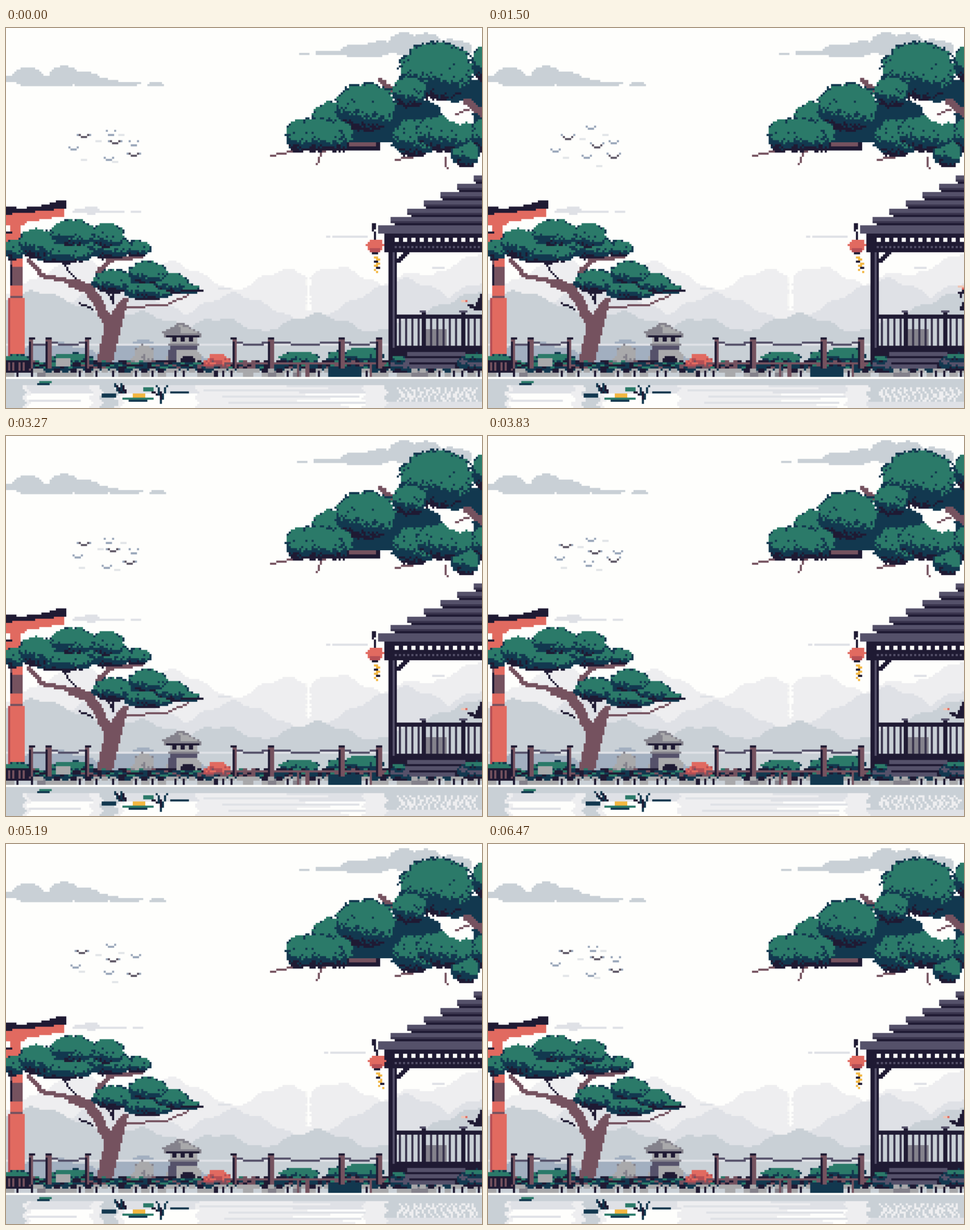
These frames come from a looping animation (837 by 669 pixels, 6.54 s). An HTML page with a canvas:

```html
<!DOCTYPE html>
<html>
<head>
<meta charset="utf-8">
<title>Lakeside garden</title>
<style>
html, body { margin: 0; width: 100%; height: 100%; overflow: hidden; background: #fefefc; }
canvas { display: block; width: 837px; height: 669px; }
</style>
</head>
<body>
<canvas id="stage" width="687" height="549"></canvas>
<script>
const W = 229, H = 183, S = 837 / W, LOOP = 6540, TAU = Math.PI * 2;
const SKY = '#fefefc', CLOUD = '#c9d0d6', MIST = '#dfe1e6', HAZE = '#eeeef0', BLUE = '#a2afc0',
  GREEN = '#2b7a69', TEAL = '#12384f', INK = '#1f1a33', SHADE = '#39344d', ROOF = '#55516a', BARK = '#75525f',
  RED = '#e16a60', RUST = '#b64f55', STONE = '#a9a9ab', ASH = '#84828c', GOLD = '#f2b640';

function layer() {
  const c = document.createElement('canvas');
  c.width = W;
  c.height = H;
  return c;
}
const small = layer(), pixels = small.getContext('2d');
const screen = document.getElementById('stage').getContext('2d');
screen.imageSmoothingEnabled = false;
let g = pixels;

const noise = (x, y) => { const v = Math.sin(x * 12.9898 + y * 78.233) * 43758.5453; return v - Math.floor(v); };
const cell = v => Math.round(v / S);
const wave = (t, cycles, phase = 0) => Math.sin(t / LOOP * TAU * cycles + phase);
const between = (t, a, b) => t >= a && t < b ? 1 : 0;

function dot(c, x, y, w = 1, h = 1) { g.fillStyle = c; g.fillRect(x, y, w, h); }

function rect(c, x, y, w, h) {
  const a = cell(x), b = cell(y);
  dot(c, a, b, Math.max(1, cell(x + w) - a), Math.max(1, cell(y + h) - b));
}

// Scanline fill without smoothing; points are a flat x, y list in stage pixels
function poly(c, p) {
  for (let r = 0; r < H; r++) {
    const y = (r + 0.5) * S, hits = [];
    for (let i = 0; i < p.length; i += 2) {
      const j = (i + 2) % p.length, y0 = p[i + 1], y1 = p[j + 1];
      if ((y0 <= y) !== (y1 <= y)) hits.push(p[i] + (y - y0) / (y1 - y0) * (p[j] - p[i]));
    }
    hits.sort((a, b) => a - b);
    for (let k = 0; k + 1 < hits.length; k += 2)
      dot(c, cell(hits[k]), r, cell(hits[k + 1]) - cell(hits[k]), 1);
  }
}

function line(c, p, w = 1) {
  for (let i = 0; i + 3 < p.length; i += 2) {
    const x = p[i] / S, y = p[i + 1] / S, dx = p[i + 2] / S - x, dy = p[i + 3] / S - y;
    const n = Math.ceil(Math.max(Math.abs(dx), Math.abs(dy))) || 1;
    for (let k = 0; k <= n; k++)
      dot(c, Math.floor(x + dx * k / n - (w - 1) / 2), Math.floor(y + dy * k / n - (w - 1) / 2), w, w);
  }
}

// Visits the cells of an ellipse with offsets u, v and squared radius d
function ellipse(cx, cy, rx, ry, paint) {
  for (let y = cell(cy - ry * 1.2); y <= cell(cy + ry * 1.2); y++)
    for (let x = cell(cx - rx * 1.2); x <= cell(cx + rx * 1.2); x++) {
      const u = ((x + 0.5) * S - cx) / rx, v = ((y + 0.5) * S - cy) / ry;
      paint(x, y, u, v, u * u + v * v);
    }
}

const puffs = (c, list, shift = 0) => list.forEach(e => ellipse(...e, (x, y, u, v, d) => {
  if (d < 1) dot(c, x + shift, y);
}));

// Leafy ellipses over a dark mass, shaded towards the lower left
function foliage(list, tones = [GREEN, TEAL, INK]) {
  const leaf = (i, x, y, u, v) => 1 + 0.06 * Math.sin(Math.atan2(v, u) * 9 + i * 2) + (noise(x, y) - 0.5) * 0.22;
  list.forEach((e, i) => ellipse(e[0], e[1] + 5, e[2], e[3], (x, y, u, v, d) => {
    if (d < leaf(i, x, y, u, v)) dot(tones[v > 0.7 ? 2 : 1], x, y);
  }));
  list.forEach((e, i) => ellipse(...e, (x, y, u, v, d) => {
    const rim = leaf(i, x, y, u, v);
    if (d > rim) return;
    const s = v - u * 0.25 + (noise(y, x) - 0.5) * 0.4;
    const fleck = d > rim - 0.1 || (s > -0.3 && noise(x + 7, y + 3) > 0.95);
    dot(s > 0.85 ? tones[2] : s > 0.38 || fleck ? tones[1] : tones[0], x, y);
  }));
}

// Rounded peaks [x, y] with a common slope
function ridge(c, peaks, slope) {
  for (let x = 0; x < W; x++) {
    const y = Math.min(...peaks.map(([px, py]) => py + slope * (Math.hypot(x * S - px, 22) - 22)));
    const top = cell(y + 3 * Math.sin(x * 0.45));
    if (top < 164) dot(c, x, top, 1, 164 - top);
  }
}

function mountains() {
  ridge(HAZE, [[130, 408], [285, 412], [492, 425], [580, 421], [720, 430], [845, 394]], 0.55);
  ridge(MIST, [[190, 450], [400, 468], [700, 442], [840, 448]], 0.52);
  ridge(CLOUD, [[50, 464], [230, 500], [372, 511], [545, 504], [860, 456]], 0.42);
  ridge(BLUE, [[85, 553], [235, 550]], 0.35);
  rect(MIST, 0, 557, 672, 4);
  rect(MIST, 372, 457, 22, 4);
  rect(MIST, 750, 419, 22, 4);
}

function torii() {
  rect(RED, 8, 345, 18, 36);
  rect(INK, 0, 358, 10, 4);
  rect(RED, 0, 362, 10, 13);
  rect(BARK, 7, 403, 22, 55);
  rect(RED, 12, 403, 17, 16);
  rect(INK, 7, 415, 5, 40);
  rect(RED, 7, 454, 24, 22);
  rect(BARK, 7, 470, 24, 4);
  rect(RED, 3, 476, 31, 112);
  rect(RUST, 3, 476, 5, 112);
  poly(RED, [0, 327, 70, 322, 104, 316, 104, 331, 38, 341, 28, 348, 0, 348]);
  poly(INK, [0, 315, 30, 317, 75, 311, 78, 306, 106, 304, 106, 316, 70, 322, 0, 328]);
}

function pine() {
  poly(BARK, [170, 502, 182, 508, 202, 478, 216, 474, 206, 512, 186, 592, 158, 592, 174, 525]);
  line(BARK, [42, 408, 62, 436, 122, 448], 2);
  line(BARK, [118, 448, 142, 458, 158, 475, 180, 520], 4);
  line(BARK, [205, 492, 280, 488, 332, 464]);
  line(BARK, [152, 455, 165, 425, 184, 408, 236, 402], 2);
  line(INK, [98, 413, 112, 430, 124, 442]);
  line(INK, [130, 485, 152, 494]);
  line(INK, [180, 468, 190, 484, 186, 466]);
  foliage([[230, 386, 24, 12], [14, 388, 18, 16], [180, 384, 42, 18], [178, 365, 30, 22], [100, 393, 54, 17],
    [55, 377, 34, 24], [118, 360, 40, 23]]);
  foliage([[318, 457, 22, 6], [250, 460, 44, 14], [290, 447, 30, 16], [188, 444, 35, 19], [250, 430, 34, 20]]);
  line(INK, [310, 461, 346, 462]);
}

function bigTree() {
  line(BARK, [467, 224, 485, 222, 512, 212]);
  line(BARK, [548, 240, 550, 228, 560, 216]);
  line(BARK, [657, 92, 680, 108], 2);
  line(BARK, [687, 232, 725, 225]);
  line(BARK, [775, 247, 772, 230]);
  puffs(TEAL, [[640, 180, 62, 24], [712, 152, 56, 28], [800, 110, 40, 22], [838, 140, 18, 60]]);
  foliage([[838, 60, 18, 28], [757, 73, 66, 49], [709, 110, 31, 25], [575, 153, 36, 24], [633, 137, 54, 40],
    [585, 188, 26, 26], [543, 186, 50, 27], [516, 188, 24, 27], [808, 217, 25, 24], [838, 185, 22, 26],
    [718, 191, 40, 31], [772, 183, 52, 31]]);
  poly(SKY, [762, 146, 780, 134, 806, 128, 822, 145, 818, 160, 800, 171, 778, 162]);
  line(BARK, [837, 150, 824, 142, 810, 128], 3);
  line(BARK, [818, 142, 790, 152]);
  rect(INK, 598, 200, 60, 14);
  rect(BARK, 603, 202, 46, 6);
}

function gazebo() {
  for (let i = 0; i < 6; i++) {
    const x = 822 - i * 29, y = 260 + i * 14.6;
    rect(INK, x + 5, y + 10, 260, 5);
    rect(ROOF, x, y, 260, 11);
    rect(SHADE, x, y + 7, 260, 4);
  }
  rect(ROOF, 656, 348, 181, 14);
  rect(INK, 664, 361, 173, 34);
  for (let x = 685; x < 837; x += 14.6) rect(SKY, x, 368, 7, 7);
  for (let x = 682; x < 837; x += 7.3) rect(ROOF, x, 382, 4, 7);
  rect(INK, 672, 390, 14, 210);
  rect(ROOF, 680, 394, 4, 170);
  line(INK, [686, 411, 704, 394], 2);
  rect(ASH, 740, 530, 36, 32);
  for (let x = 690; x < 837; x += 11) rect(SHADE, x, 512, 5, 50);
  for (const x of [730, 800]) {
    rect(INK, x, 500, 7, 64);
    rect(ROOF, x - 3, 497, 13, 4);
  }
  rect(INK, 684, 505, 153, 6);
  rect(INK, 684, 558, 153, 43);
  for (let i = 0; i < 3; i++) rect(ROOF, 706 - i * 9, 569 + i * 11, 100, 7);
  foliage([[692, 594, 18, 8], [820, 588, 26, 11]], [ROOF, TEAL, INK]);
  foliage([[823, 578, 18, 6], [690, 582, 12, 5]]);
}

function shrine() {
  poly(ASH, [275, 536, 304, 519, 314, 521, 345, 538, 343, 543, 278, 543]);
  poly(STONE, [304, 522, 322, 528, 343, 538, 308, 536]);
  rect(INK, 280, 540, 60, 4);
  rect(STONE, 289, 543, 48, 14);
  for (let x = 294; x < 330; x += 14) rect(INK, x, 544, 7, 7);
  rect(ASH, 284, 554, 55, 6);
  rect(ROOF, 289, 560, 47, 7);
  poly(STONE, [288, 566, 336, 566, 345, 580, 345, 600, 280, 600, 282, 580]);
  rect(ROOF, 286, 566, 14, 32);
  poly(INK, [308, 600, 308, 584, 314, 576, 326, 576, 333, 584, 333, 600]);
  rect(GREEN, 316, 588, 10, 9);
}

function bank() {
  foliage([[20, 585, 26, 10], [115, 582, 38, 10], [515, 580, 35, 10], [590, 578, 25, 10], [628, 575, 36, 13]]);
  foliage([[243, 574, 17, 17], [230, 584, 10, 9]], [STONE, ASH, ROOF]);
  rect(TEAL, 0, 588, 837, 15);
  for (let x = 0; x < W; x++)
    for (let r = 160; r < 164; r++) {
      const n = noise(x >> 1, r);
      if (n > 0.45) dot(n > 0.86 ? GREEN : n > 0.76 ? BARK : INK, x, r);
    }
  rect(STONE, 0, 602, 837, 13);
  for (let i = 0; i < 60; i++) {
    const x = i * 14, n = noise(i, 31);
    rect(n > 0.6 ? CLOUD : n > 0.45 ? ASH : STONE, x, 603, 14, 11);
    rect(n < 0.3 ? INK : n < 0.5 ? TEAL : STONE, x, 600, 11, 5);
    if (n > 0.75) rect(INK, x + 3, 604, 4, 10);
  }
  rect(INK, 0, 585, 46, 23);
  for (let x = 3; x < 46; x += 9) rect(BARK, x, 590, 4, 14);
  rect(STONE, 88, 581, 24, 16);
  rect(STONE, 418, 598, 18, 16);
  rect(TEAL, 565, 596, 60, 17);
  for (const x of [510, 528, 638]) rect(BARK, x, 592, 6, 24);
  foliage([[358, 588, 11, 6], [384, 587, 11, 7], [372, 581, 15, 9]], [RED, RUST, BARK]);
  rect(SKY, 0, 615, 837, 4);
}

function fence() {
  const posts = [45, 75, 144, 401, 466, 590, 656];
  posts.forEach((x, i) => {
    const next = posts[i + 1], mid = (x + next) / 2;
    if (next && next - x < 200) line(ROOF, [x, 552, mid - 10, 557, mid + 10, 557, next, 552]);
  });
  rect(BARK, 385, 589, 285, 4);
  for (const x of posts) {
    rect(BARK, x - 4, 548, 8, 50);
    rect(INK, x - 4, 552, 3, 46);
    rect(INK, x - 6, 546, 12, 4);
  }
}

function buildScene() {
  const c = layer();
  g = c.getContext('2d');
  [mountains, torii, pine, bigTree, shrine, bank, fence, gazebo].forEach(part => part());
  g = pixels;
  return c;
}
const scene = buildScene();

// Only the thin ends of the clouds creep by one cell
function clouds(t) {
  const half = t % (LOOP / 2);
  const left = between(t, 2500, 5870), right = -between(t, 380, 3820);
  const low = between(half, 800, 2450), far = -between(half, 880, 2150);
  puffs(CLOUD, [[6, 89, 30, 6], [38, 86, 27, 17], [75, 93, 60, 9], [102, 85, 27, 18], [138, 90, 28, 13],
    [165, 95, 35, 6]]);
  puffs(CLOUD, [[206, 98, 33, 4], [264, 99, 16, 3]], left);
  puffs(CLOUD, [[618, 40, 30, 12], [660, 35, 30, 12], [700, 28, 27, 20], [738, 26, 28, 17], [780, 36, 40, 16],
    [640, 45, 24, 8]]);
  puffs(CLOUD, [[578, 44, 38, 4], [524, 46, 8, 2]], right);
  puffs(MIST, [[142, 322, 30, 3], [150, 321, 14, 7]]);
  puffs(MIST, [[185, 324, 26, 2], [229, 324, 10, 2]], low);
  puffs(MIST, [[605, 367, 31, 2], [567, 367, 5, 2]], far);
}

// Home places of the birds: large, middling and faint in turn
const homes = [[138, 190], [183, 179], [205, 184], [190, 202], [225, 200], [164, 194],
  [222, 223], [122, 212], [135, 226], [178, 226], [193, 236]];
const plumage = ['#5f5866', '#9aa7ba', '#e2e5e8'];

function birds(t) {
  homes.forEach(([hx, hy], i) => {
    const kind = i === 9 ? 1 : i === 10 ? 2 : i % 3, n = 3 - kind, c = plumage[kind];
    const x = Math.floor((hx + 3 * wave(t, 1, i * 2.4)) / S), y = Math.floor((hy + 4 * wave(t, 2, i * 1.7)) / S);
    const lift = wave(t, 6, i * 1.9) > 0.7;
    for (let k = -n; k <= n; k++) {
      const edge = Math.abs(k);
      dot(edge === n && n > 1 ? plumage[1] : c, x + k, y + (edge < 2 ? 1 : lift && edge === n ? -1 : 0));
    }
  });
}

function lantern(t) {
  const dx = between(t, 4850, 5600) * S, x = 649 + dx;
  const swing = wave(t, 2, -1.5);
  line(INK, [645, 346, x, 372]);
  rect(INK, 643, 345, 6, 8);
  puffs(RED, [[x, 382, 15, 11]]);
  rect(RUST, x - 8, 389, 16, 4);
  rect(INK, x - 4, 393, 8, 6);
  for (let i = 0; i < 8; i++)
    rect(i % 3 === 2 ? INK : GOLD, x + (i % 2 ? 1 : -3) + i * (0.5 + 0.5 * swing), 401 + i * 4, i < 6 ? 7 : 3, 4);
}

function visitor(t) {
  const raise = Math.exp(-(((t - 1500) / 600) ** 2));
  const x = 804 + 27 * raise, y = 480 - 24 * raise;
  poly(INK, [x + 8, y + 4, 824, y + 9, 832, 474, 837, 462, 837, 498, 828, 497, x + 10, y + 12]);
  rect('#f1c5b4', x - 4, y - 2, 9, 4);
  rect(RED, x + 3, y, 4, 4);
}

function waterfall(t) {
  const shift = Math.floor(t / 70);
  for (let r = 119; r < 136; r++) {
    const n = noise(r - shift, 4);
    dot(SKY, 145, r, n > 0.5 ? 2 : 1, 1);
    if (n > 0.5) dot('#f7f7f5', 144, r);
  }
}

function water(t) {
  rect(CLOUD, 0, 618, 837, 10);
  rect(HAZE, 0, 627, 837, 42);
  for (let r = 172; r < H; r++) {
    const y = r * S, sway = 4 * wave(t, 6, r * 1.3);
    const pale = r < 176 ? MIST : SKY;
    rect(pale, 40 + sway, y, 110, S);
    rect(pale, 205 + sway, y, 130, S);
    rect(pale, 480 + sway, y, 150, S);
    rect(CLOUD, 0, y, 32 + sway, S);
    rect(CLOUD, 168 + sway, y, 27, S);
    rect(r > 179 ? MIST : CLOUD, 668 + sway, y, 175, S);
    const n = noise(r, 9);
    rect(r % 3 ? HAZE : MIST, 340 + n * 60 + sway * 2, y, 150 + n * 120, S);
    if (r % 4 === 3) rect(MIST, 35 + n * 40 + sway, y, 90, S);
  }
  for (let r = 173; r < 180; r++)
    for (let x = 189; x < 227; x += 3)
      dot(HAZE, x + Math.round(wave(t, -6, r * 0.9 + x * 0.1)), r, 1 + (noise(x, r) > 0.7), 1);
}

function lilies(t) {
  const d = between(t % (LOOP / 2), 100, 900) * S;
  rect(GREEN, 58 + d, 622, 22, 4);
  rect(TEAL, 54 + d, 625, 22, 3);
  rect(TEAL, 168 + d, 645, 24, 4);
  rect(GREEN, 241, 634, 18, 4);
  rect(TEAL, 290, 640, 32, 4);
  rect(GREEN, 206, 649, 54, 6);
  rect(TEAL, 216, 654, 34, 4);
  rect(GOLD, 222, 644, 22, 7);
  for (let i = 0; i < 4; i++) {
    line(i % 2 ? INK : TEAL, [192 + i * 5 - d, 627 + 4 * (i % 2), 200 + i * 3, 642]);
    line(i % 2 ? TEAL : INK, [258 + i * 8, 640 - 9 * (i % 2), 272, 648 + i * 4]);
  }
}

function draw(t) {
  dot(SKY, 0, 0, W, H);
  clouds(t);
  g.drawImage(scene, 0, 0);
  [waterfall, birds, lantern, visitor, water, lilies].forEach(part => part(t));
  screen.drawImage(small, 0, 0, screen.canvas.width, screen.canvas.height);
}

let start;
function tick(now) {
  if (start === undefined) start = now;
  draw((now - start) % LOOP);
  requestAnimationFrame(tick);
}
draw(0);
requestAnimationFrame(tick);
</script>
</body>
</html>
```
